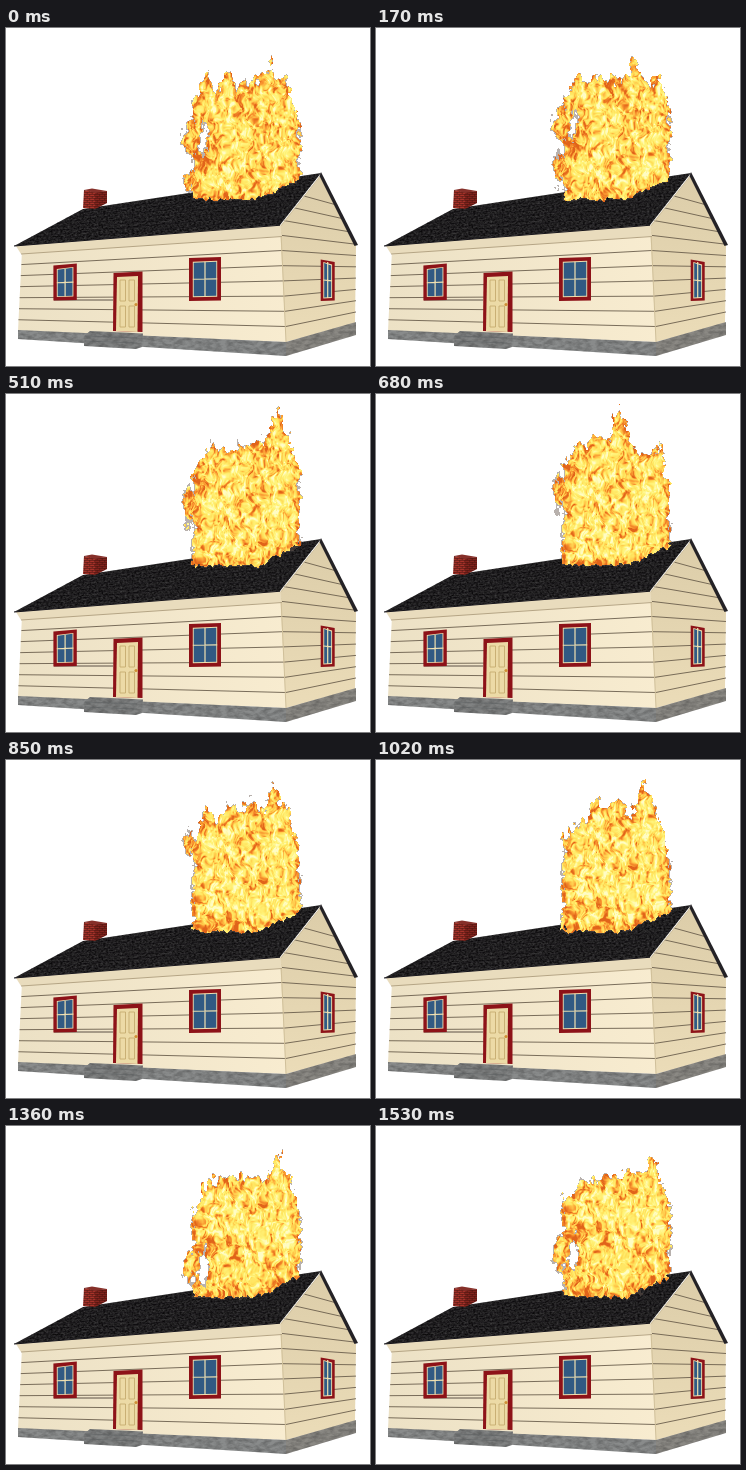
Animation of 364 by 338 pixels, one loop 1.7 s. Source, as an HTML page with a canvas:

```html
<!DOCTYPE html>
<html lang="en">
<head>
<meta charset="utf-8">
<title>House on fire</title>
<style>
  html, body { margin: 0; width: 100%; height: 100%; overflow: hidden; background: #fff; }
  svg, canvas { position: absolute; left: 0; top: 0; display: block; }
</style>
</head>
<body>
<svg width="364" height="338" viewBox="0 0 364 338">
  <defs>
    <filter id="shingle" x="0" y="0" width="1" height="1" color-interpolation-filters="sRGB">
      <feTurbulence type="fractalNoise" baseFrequency=".42 .6" numOctaves="2" seed="4"/>
      <feColorMatrix values=".3 0 0 0 -.02  .3 0 0 0 -.025  .3 0 0 0 -.02  0 0 0 0 1"/>
      <feComposite in2="SourceGraphic" operator="in"/>
    </filter>
    <filter id="stone" x="0" y="0" width="1" height="1" color-interpolation-filters="sRGB">
      <feTurbulence type="fractalNoise" baseFrequency=".14 .3" numOctaves="3" seed="9"/>
      <feColorMatrix values="0 0 0 0 .1  0 0 0 0 .1  0 0 0 0 .1  .6 0 0 0 -.2"/>
      <feComposite in2="SourceGraphic" operator="in" result="grain"/>
      <feMerge><feMergeNode in="SourceGraphic"/><feMergeNode in="grain"/></feMerge>
    </filter>
    <linearGradient id="wall">
      <stop stop-color="#ece1c5"/><stop offset="1" stop-color="#f8ecd0"/>
    </linearGradient>
    <linearGradient id="side" x2="0" y2="1">
      <stop stop-color="#dccda9"/><stop offset="1" stop-color="#ebdcb8"/>
    </linearGradient>
    <pattern id="brick" width="5" height="4" patternUnits="userSpaceOnUse">
      <path fill="#a8332a" d="M0 0h5v4H0z"/>
      <path stroke="#551812" stroke-width=".7" fill="none" d="M0 .4h5M0 2.4h5M1.2 0v2M3.700 2v2"/>
    </pattern>
    <clipPath id="gable"><path d="M274 198L314 148L350 218V296L280 315Z"/></clipPath>
  </defs>
  <g id="house"></g>
</svg>
<canvas id="fire" width="364" height="338"></canvas>
<script>
const house = document.getElementById('house');
const ctx = document.getElementById('fire').getContext('2d');
const mix = (a, b, t) => a + (b - a) * t;
const clamp = (v, a, b) => Math.max(a, Math.min(b, v));

// House
const RED = '#8d1218', CREAM = '#f0e0b0', LINE = '#6b5f4d';
let markup = '';
const shape = (d, fill, extra = '') => { markup += `<path d="${d}" fill="${fill}" ${extra}/>`; };
const line = (d, color, w = 1, extra = '') => shape(d, 'none', `stroke="${color}" stroke-width="${w}" ${extra}`);

function walls() {
  shape('M16 222L275 203L280 314L12 303Z', 'url(#wall)');
  shape('M274 198L314 148L350 218L349 295L280 314Z', 'url(#side)');
  for (let k = -3; k < 7; k++) {
    const y = 207.3 + 15.2 * k, far = y - 314, x = 275 + Math.max(0, k) * .8;
    if (k > 0) line(`M${16 - k * .6} ${303 + far * .726}L${x} ${y}`, LINE, .9);
    line(`M${x} ${y}L350 ${295.5 + far * .743}`, LINE, .9, 'clip-path="url(#gable)"');
  }
  line('M48 272L107 272', '#4b4037', .9);
  line('M275 204L280 314', '#d0c09a', 1);
  shape('M12 302L280 314V328L12 311Z', '#898b8b', 'filter="url(#stone)"');
  shape('M280 314L350 294V307L280 328Z', '#8b8984', 'filter="url(#stone)"');
}

function roof() {
  shape('M10 218L274 197L276 208L15 226Z', '#e9dcbd');
  line('M15 226L276 208.500', '#b5a585', 1);
  shape('M8 218L77 181L315 145L274 197Z', '#222', 'filter="url(#shingle)"');
  for (let t = .125; t < 1; t += .125)
    line(`M${mix(77, 8, t)} ${mix(181, 218, t)}L${mix(315, 274, t)} ${mix(145, 197, t)}`, '#0c0b0f', .6, 'opacity=".6"');
  line('M8 218L274 197.300', '#17151a', 1.1);
  line('M275 198L314.500 147.500', '#cdbf9d', .9);
  shape('M315 144L352 217L348.500 218L313.500 148Z', '#242226');
  shape('M78 162L89 164V181L77 180Z', 'url(#brick)');
  shape('M89 164L101 163V175L89 181Z', 'url(#brick)');
  shape('M89 164L101 163V175L89 181Z', '#40080655');
  shape('M78 162L86 160.500L101 163L89 165Z', '#86302a');
}

function pane(x, y, w, h, slope, rim) {
  const box = (m, fill) => shape(
    `M${x + m} ${y + m}L${x + w - m} ${y + m + slope}V${y + h - m}L${x + m} ${y + h - m + .5}Z`, fill);
  box(0, RED);
  box(rim, CREAM);
  box(rim + .9, '#315a83');
  line(`M${x + w / 2} ${y + rim}V${y + h - rim}M${x + rim} ${y + h / 2}L${x + w - rim} ${y + h / 2 + slope / 3}`, CREAM, 1.2);
}

function door() {
  shape('M107.500 245L136.500 243.500V304L107 303Z', RED);
  shape('M111 249L132 248L131.500 304L110 303Z', '#ecdaa6');
  for (const [y, h] of [[252, 21], [278, 21]])
    for (const x of [114, 123]) line(`M${x} ${y}h5.500v${h}h-5.500z`, '#c6ac70', .9);
  markup += '<circle cx="130" cy="276.500" r="1.600" fill="#cf8f35"/>';
  shape('M84 303L137 305.500L136 319L130 321L78 318V308Z', '#808282', 'filter="url(#stone)"');
  for (const y of [308, 313]) line(`M79 ${y}L131 ${y + 2}`, '#5d6062', .6);
}

walls();
roof();
pane(47.4, 237.5, 23.4, 34.5, -2, 3.4);
pane(183, 230, 32, 42.5, -1, 3.8);
pane(314.7, 231.5, 14, 41, 2.5, 2.6);
door();
house.innerHTML = markup;

// Fire: a block of flame with one leaping spire, and licks rising along its left side
const STEP = 170, STEPS = 10, RISE = 14, LEFT = 187, RIGHT = 293;
const SPIRES = [[264, 33], [257, 30], [250, 20], [270, 14], [243, 11], [267, 23], [267, 20], [268, 21], [272, 24], [275, 27]];
const LICKS = [{ born: 7, x: 185, width: 8, gap: true }, { born: 0, x: 182, width: 5.5 }];
const RAMP = [[.2, '#e0641a'], [.34, '#f8942f'], [.44, '#ffc448'], [.54, '#ffe25c'], [.7, '#fff47c'], [.85, '#fffcc4']]
  .map(([at, hex]) => [at, ...hex.match(/\w\w/g).map(c => parseInt(c, 16))]);

function hash(x, y) {
  let h = Math.imul(x, 374761393) + Math.imul(y, 668265263);
  h = Math.imul(h ^ (h >>> 13), 1274126177);
  return ((h ^ (h >>> 16)) >>> 0) / 4294967296;
}

function noise(x, y) {
  const i = Math.floor(x), j = Math.floor(y);
  const ease = t => t * t * (3 - 2 * t), u = ease(x - i), v = ease(y - j);
  return mix(mix(hash(i, j), hash(i + 1, j), u), mix(hash(i, j + 1), hash(i + 1, j + 1), u), v);
}
const wobble = (x, y) => noise(x, y) - .5;

const baseAt = x => 171 - Math.max(0, x - 250) * .46 - Math.max(0, 190 - x) * .5;
const inOval = (x, y, cx, cy, rx, ry) => (1 - Math.hypot((x - cx) / rx, (y - cy) / ry)) * rx;

function topAt(x, step) {
  const [sx, sy] = SPIRES[step];
  const crown = 50 + 24 * wobble(x / 11, step * 7.3) + Math.max(0, 202 - x) * 2 + Math.max(0, x - 282) * 4;
  return Math.min(crown, sy + Math.abs(x - sx) * 2.8);
}

function depthAt(x, y, base, step) {
  let body = Math.min(y - topAt(x, step), x - LEFT, RIGHT - x, base), loose = -9;
  for (const { born, x: cx, width, gap } of LICKS) {
    const age = (step - born + STEPS) % STEPS;
    if (age > 5) continue;
    const cy = 154 - RISE * age;
    if (gap) body = Math.min(body, -inOval(x, y, cx + 12, cy, 6 - age * .5, 20 - age * 2));
    loose = Math.max(loose, inOval(x, y, cx, cy, width, 8 + 9 * Math.sin((age + .5) / 6.5 * Math.PI)));
  }
  return Math.max(body, loose);
}

function color(heat) {
  const h = clamp(heat, RAMP[0][0], RAMP[RAMP.length - 1][0]);
  const i = Math.max(1, RAMP.findIndex(s => h <= s[0]));
  const a = RAMP[i - 1], b = RAMP[i], t = (h - a[0]) / (b[0] - a[0]);
  return [1, 2, 3].map(c => mix(a[c], b[c], t));
}

function flame(step) {
  const left = 170, up = 4, w = 136, h = 174;
  const img = new ImageData(w, h);
  for (let j = 0; j < h; j++) for (let i = 0; i < w; i++) {
    const x = left + i, y = up + j, s = y + step * RISE;
    const X = x + 6 * wobble(x / 5, s / 6) + 4 * wobble(x / 2, s / 2.5 + 70);
    const Y = y + 15 * wobble(x / 3.5 + 40, s / 8) + 5 * wobble(x / 1.7, s / 3);
    const depth = depthAt(X, Y, baseAt(X) - mix(y, Y, .3), step);
    if (depth < -1) continue;
    const u = x + 7 * wobble(x / 9 + 9, s / 9), v = s + 6 * wobble(x / 6, s / 6 + 33);
    const grain = .4 * wobble(u / 4.5, v / 7) + .36 * wobble(u / 2.3, v / 3.6 + 50) + .24 * wobble(u / 1.3, v / 1.9);
    const heat = .58 + grain * 1.25 - .2 * (1 - clamp(depth / 14, 0, 1));
    const edge = depth < 0;
    const rgb = edge ? [105, 90, 80] : color(heat);
    img.data.set([...rgb, edge ? 120 : 255], (j * w + i) * 4);
  }
  return { img, left, up };
}

const flames = SPIRES.map((_, step) => flame(step));
let shown = -1;

function draw(ms) {
  const k = Math.floor(ms / STEP) % STEPS;
  if (k === shown) return;
  shown = k;
  const { img, left, up } = flames[k];
  ctx.clearRect(0, 0, 364, 338);
  ctx.putImageData(img, left, up);
}

const start = performance.now();
function tick() {
  draw(performance.now() - start);
  requestAnimationFrame(tick);
}
tick();
</script>
</body>
</html>
```
